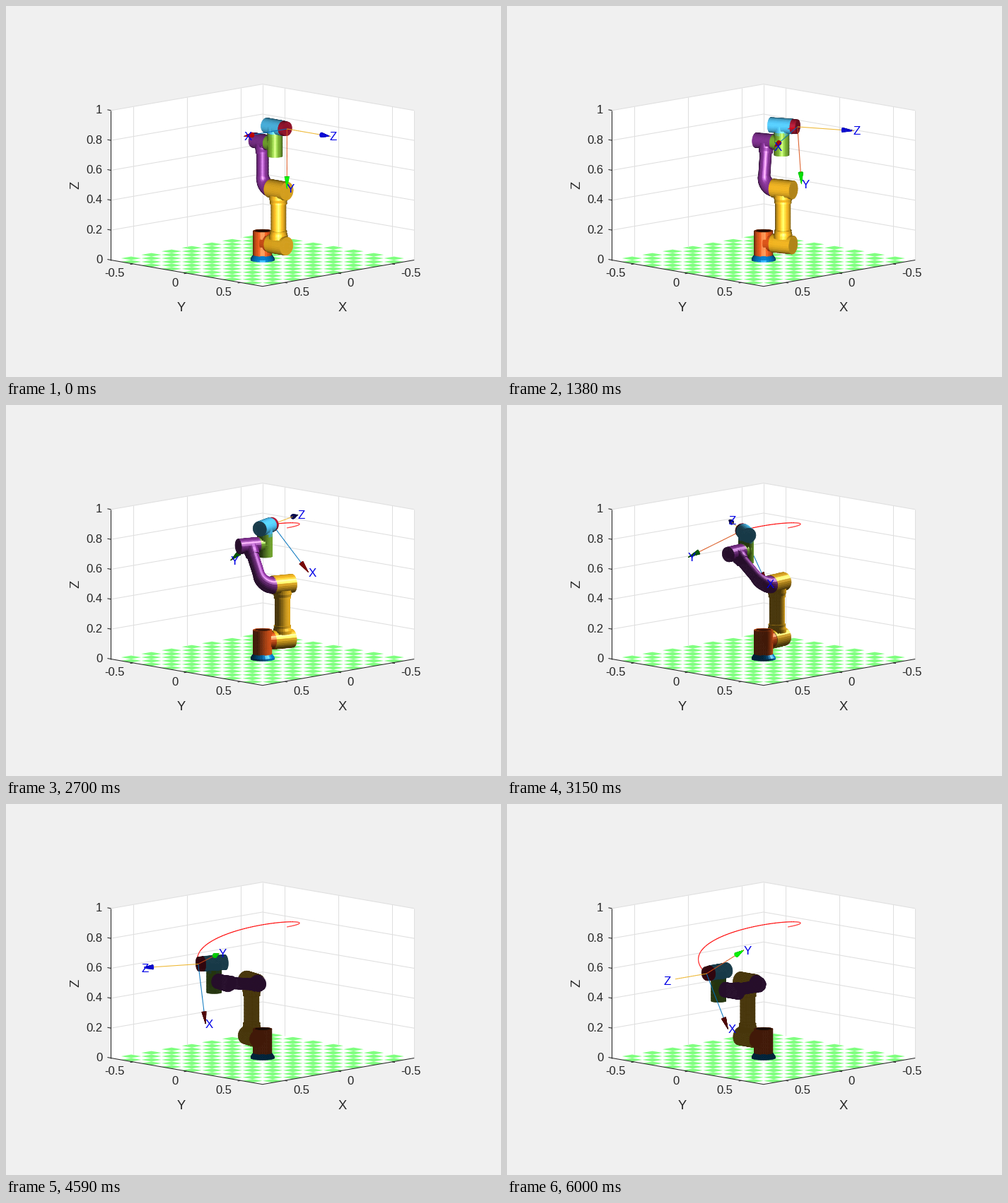
Animation, 700 px wide and 525 px high, one loop 6030 ms. Source, as a matplotlib script:

```python
import numpy as np
import matplotlib.pyplot as plt
from matplotlib.animation import FuncAnimation
from matplotlib.collections import LineCollection, PolyCollection
from matplotlib.colors import to_rgb

FRAMES = 201
LIM = 0.705
A2, A3, D1, D4, D5, D6 = 0.368, 0.3035, 0.12, 0.115, 0.1135, 0.112
BLUE, ORANGE, YELLOW, PURPLE, GREEN, CYAN, RED = map(to_rgb, (
    "#0072BD", "#D95319", "#EDB120", "#7E2F8E", "#77AC30", "#4DBEEE", "#A2142F"))
UP = np.array([0.0, 0.0, 1.0])
TILT = np.radians(10)
EYE = np.array([0, np.cos(TILT), np.sin(TILT)])
EYE_UP = np.array([0, -np.sin(TILT), np.cos(TILT)])

plt.rcParams["font.family"] = "Liberation Sans"
fig = plt.figure(figsize=(7, 5.25), dpi=100, facecolor="#f0f0f0")
ax = fig.add_axes([0, 0, 1, 1])
ax.set_xlim(0, 700)
ax.set_ylim(525, 0)
ax.axis("off")


# ---- projection: space is (right, toward the viewer, up) ----
def project(p):
    p = np.asarray(p, float)
    return np.stack([362.8 + 215 * p[..., 0],
                     359.5 + 37.3 * p[..., 1] - 211.7 * p[..., 2]], -1)


def world(x, y, z):
    return project([(y - x) / 2 ** 0.5, (x + y) / 2 ** 0.5, z])


def inside(p):
    x, y = p[:, 1] - p[:, 0], p[:, 0] + p[:, 1]
    lim = LIM * 2 ** 0.5
    return (abs(x) < lim) & (abs(y) < lim) & (p[:, 2] > 0) & (p[:, 2] < 1)


def heading(deg):
    a = np.radians(deg)
    return np.array([np.sin(a), np.cos(a), 0])


# ---- static stage ----
def draw_stage():
    L = LIM
    box = [(L, -L, 0), (L, L, 0), (-L, L, 0), (-L, L, 1), (-L, -L, 1), (L, -L, 1)]
    ax.add_patch(plt.Polygon([world(*c) for c in box], fc="white", lw=0, zorder=0))

    edges = np.linspace(-L, L, 16)
    tiles = [[world(edges[i + a], edges[j + b], 0)
              for a, b in ((0, 0), (1, 0), (1, 1), (0, 1))]
             for i in range(15) for j in range(15) if (i + j) % 2]
    ax.add_collection(PolyCollection(tiles, facecolors="#80ff80", linewidths=0, zorder=1))

    grid = [[world(-L, -L, 0), world(-L, -L, 1)], [world(-L, L, 0), world(-L, L, 1)]]
    for t in (-0.5, 0, 0.5):
        grid.append([world(t, -L, 0), world(t, -L, 1)])
        grid.append([world(-L, t, 0), world(-L, t, 1)])
    for z in np.arange(1, 6) / 5:
        grid.append([world(L, -L, z), world(-L, -L, z), world(-L, L, z)])
    ax.add_collection(LineCollection(grid, colors="#dfdfdf", linewidths=0.75, zorder=2))

    dark = "#262626"
    out = 0.026
    rules = [[world(L, -L, 1), world(L, -L, 0)],
             [world(L, -L, 0), world(L, L, 0), world(-L, L, 0)]]
    for t in (-0.5, 0, 0.5):
        rules.append([world(L, t, 0), world(L + out, t, 0)])
        rules.append([world(t, L, 0), world(t, L + out, 0)])
        name = f"{t:g}"
        x, y = world(L, t, 0)
        ax.text(x - 12, y + 14, name, size=12, color=dark, ha="right", va="center")
        x, y = world(t, L, 0)
        ax.text(x + 12, y + 14, name, size=12, color=dark, ha="left", va="center")
    for k in range(6):
        x, y = world(L, -L, k / 5)
        rules.append([(x, y), (x - 5, y - 1)])
        ax.text(136.5, y, f"{k / 5:g}", size=12, color=dark, ha="right", va="center")
    ax.add_collection(LineCollection(rules, colors=dark, linewidths=0.75, zorder=2))
    for name, x, y, rot in (("Y", 248, 427.5, 0), ("X", 476, 427.5, 0), ("Z", 98.5, 253, 90)):
        ax.text(x, y, name, size=13.2, color=dark, rotation=rot, ha="center", va="center")


# ---- meshes: (quads, normals, colours) in link coordinates ----
def skin(a, b):
    return np.stack([a[:-1], a[1:], b[1:], b[:-1]], 1)


def mesh(quads, normals, rgb):
    q, n = np.concatenate(quads), np.concatenate(normals)
    return q, n, np.tile(rgb, (len(q), 1))


def tube(k, at, profile, rgb, n=28):
    """Surface of revolution about axis k; profile holds (height, radius)."""
    i, j = (k + 1) % 3, (k + 2) % 3
    ang = np.linspace(0, 2 * np.pi, n + 1)
    mid = (ang[:-1] + ang[1:]) / 2

    def ring(t, r, a=ang):
        p = np.zeros((len(a), 3))
        p[:, k], p[:, i], p[:, j] = t, r * np.cos(a), r * np.sin(a)
        return p

    quads, normals = [], []
    for (t0, r0), (t1, r1) in zip(profile, profile[1:]):
        size = np.hypot(t1 - t0, r1 - r0)
        steps = max(1, int(np.ceil(size / 0.025)))
        f = np.linspace(0, 1, steps + 1)
        ts, rs = t0 + (t1 - t0) * f, r0 + (r1 - r0) * f
        for s in range(steps):
            quads.append(skin(ring(ts[s], rs[s]), ring(ts[s + 1], rs[s + 1])) + at)
            normals.append(ring((r0 - r1) / size, (t1 - t0) / size, mid))
    return mesh(quads, normals, rgb)


def bend(radius, r0, r1, rgb, steps=9, n=28):
    """Quarter pipe from the first axis round to the third."""
    ang = np.linspace(0, 2 * np.pi, n + 1)
    mid = (ang[:-1] + ang[1:]) / 2

    def around(t, a):
        c = np.cos(a)
        return np.stack([c * np.sin(t), np.sin(a), c * np.cos(t)], 1)

    def ring(f):
        t = f * np.pi / 2
        path = np.array([radius * (1 - np.sin(t)), 0, radius * (1 - np.cos(t))])
        return path + (r0 + (r1 - r0) * f) * around(t, ang)

    quads = [skin(ring(s / steps), ring((s + 1) / steps)) for s in range(steps)]
    normals = [around((s + 0.5) / steps * np.pi / 2, mid) for s in range(steps)]
    return mesh(quads, normals, rgb)


def join(*parts):
    return [np.concatenate(x) for x in zip(*parts)]


def barrel(start, end, r):
    return [(start, 0), (start, r), (end, r), (end, 0)]


O = np.zeros(3)
SIDE = np.array([0.148, 0, 0])
BASE = join(
    tube(2, O, [(0, 0.077), (0.01, 0.077), (0.035, 0.06)], BLUE),
    tube(2, O, [(0.035, 0.061), (0.194, 0.061), (0.194, 0.052)], ORANGE),
    tube(2, O, [(0.192, 0.052), (0.192, 0)], np.array(ORANGE) * 0.35))
UPPER = join(
    tube(0, O, [(0, 0.055), (0.075, 0.055)], ORANGE),
    tube(0, O, barrel(0.073, 0.223, 0.06), YELLOW),
    tube(0, UP * A2, barrel(0.073, 0.225, 0.06), YELLOW),
    tube(2, SIDE, [(0.04, 0.059), (0.062, 0.059), (0.08, 0.054), (0.092, 0.055),
                   (0.092, 0.049), (0.275, 0.049), (0.275, 0.055), (0.288, 0.054),
                   (0.306, 0.059), (0.33, 0.059)], YELLOW))
FOREARM = join(
    bend(0.078, 0.057, 0.04, PURPLE),
    tube(2, O, [(0.075, 0.038), (0.228, 0.038), (0.228, 0.045), (0.242, 0.045),
                (0.262, 0.048), (0.29, 0.048)], PURPLE),
    tube(0, UP * A3, barrel(-0.081, 0.062, 0.049), PURPLE))
WRIST = join(
    tube(0, O, [(0.05, 0.047), (D4, 0.047)], GREEN),
    tube(2, np.array([D4, 0, 0]), barrel(-0.083, 0.068, 0.049), GREEN))
HEAD = join(
    tube(2, O, [(-0.062, 0.047), (0, 0.047)], CYAN),
    tube(0, O, barrel(-0.081, 0.077, 0.049), CYAN),
    tube(0, O, [(0.077, 0.048), (D6, 0.046), (D6, 0)], RED))
CONES = [tube(k, O, [(0.32, 0), (0.32, 0.016), (0.4, 0)], np.eye(3)[k], n=12)
         for k in range(3)]


# ---- motion ----
def ease(f):
    return f ** 3 * (10 - 15 * f + 6 * f * f)


def pose(s):
    """Link frames (rows are axes) with origins, and the tool frame."""
    n, m = heading(45 + 180 * s), heading(135 + 180 * s)
    b = s * np.pi / 2
    arm = np.sin(b) * m + np.cos(b) * UP
    zt, h = heading(45 + 270 * s), heading(135 + 270 * s)
    g = np.radians(120 * s)
    shoulder = UP * D1
    elbow = shoulder + UP * A2
    wrist = elbow + arm * A3
    head = wrist + n * D4 + UP * D5
    body = np.array([n, m, UP])
    links = [(BASE, np.eye(3), O), (UPPER, body, shoulder),
             (FOREARM, np.array([n, np.cos(b) * m - np.sin(b) * UP, arm]), elbow),
             (WRIST, body, wrist), (HEAD, np.array([zt, h, UP]), head)]
    tool = np.array([-np.cos(g) * h - np.sin(g) * UP,
                     np.sin(g) * h - np.cos(g) * UP, zt])
    return links, tool, head + zt * D6


TRAIL = np.array([pose(ease(i / (FRAMES - 1)))[2] for i in range(FRAMES)])


def lamp(s):
    """Swings from the viewer, over the upper right, to behind the arm."""
    swing = np.pi / 2 * (1 - np.cos(np.pi * s))
    k = np.radians(40)
    over = np.cos(k) * np.array([1, 0, 0]) + np.sin(k) * EYE_UP
    return np.cos(swing) * EYE + np.sin(swing) * over


def shade(normals, rgb, s):
    light = lamp(s)
    half = light + EYE
    half /= np.linalg.norm(half) + 1e-9
    diff = np.clip(normals @ light, 0, 1)
    spec = np.where(diff > 0, np.clip(normals @ half, 0, 1) ** 36, 0)
    return np.clip(rgb * (0.3 + 0.85 * diff)[:, None] + 0.55 * spec[:, None], 0, 1)


def strokes(points, rgb):
    a, b = points[:-1], points[1:]
    return np.stack([a, b, b, a], 1), np.tile(rgb, (len(a), 1))


def scene(i):
    s = ease(i / (FRAMES - 1))
    links, tool, tip = pose(s)
    quads, colors, widths, bias = [], [], [], []

    def add(q, c, width, near=0.0):
        quads.append(q)
        colors.append(c)
        widths.append(np.full(len(q), width))
        bias.append(np.full(len(q), near))

    for (q, nrm, rgb), frame, origin in links:
        nrm = nrm @ frame
        seen = nrm @ EYE > 0
        add(q[seen] @ frame + origin, shade(nrm[seen], rgb[seen], s), 0.45)

    glow = 0.33 + 0.67 * abs(np.cos(np.pi * s)) ** 3
    levels = (0.3 + 0.5 * (1 - s) ** 2, glow, glow * 0.9)
    for k, rgb in enumerate((BLUE, ORANGE, YELLOW)):
        reach = np.linspace(0, 0.4, 41)[:, None]
        q, c = strokes(tip + reach * tool[k], rgb)
        keep = inside(q.mean(1))
        add(q[keep], c[keep], 0.75, 0.01)
        q, nrm, rgb = CONES[k]
        q, nrm = q @ tool + tip, nrm @ tool
        keep = inside(q.mean(1)) & (nrm @ EYE > 0)
        facing = 0.75 + 0.25 * (nrm[keep] @ EYE)
        add(q[keep], rgb[keep] * (levels[k] * facing)[:, None], 0.3, 0.01)
    if i:
        add(*strokes(TRAIL[:i + 1], (1, 0, 0)), 0.85)

    q, c, w = map(np.concatenate, (quads, colors, widths))
    order = np.argsort(q.mean(1) @ EYE + np.concatenate(bias), kind="stable")
    ends = project(tip + 0.4 * tool)
    return project(q[order]), c[order], w[order], ends


draw_stage()
robot = PolyCollection([], zorder=5, snap=False)
ax.add_collection(robot, autolim=False)
names = [ax.text(0, 0, c, size=12.2, color="#0000e6", va="center", zorder=6) for c in "XYZ"]


def update(i):
    verts, colors, widths, ends = scene(i)
    robot.set_verts(verts)
    robot.set_facecolor(colors)
    robot.set_edgecolor(colors)
    robot.set_linewidth(widths)
    for label, (x, y) in zip(names, ends):
        label.set_position((x - 0.3, y + 1.3))
    return [robot, *names]


anim = FuncAnimation(fig, update, frames=FRAMES, interval=30, repeat=True,
                     repeat_delay=0, blit=False)
plt.show()
```
